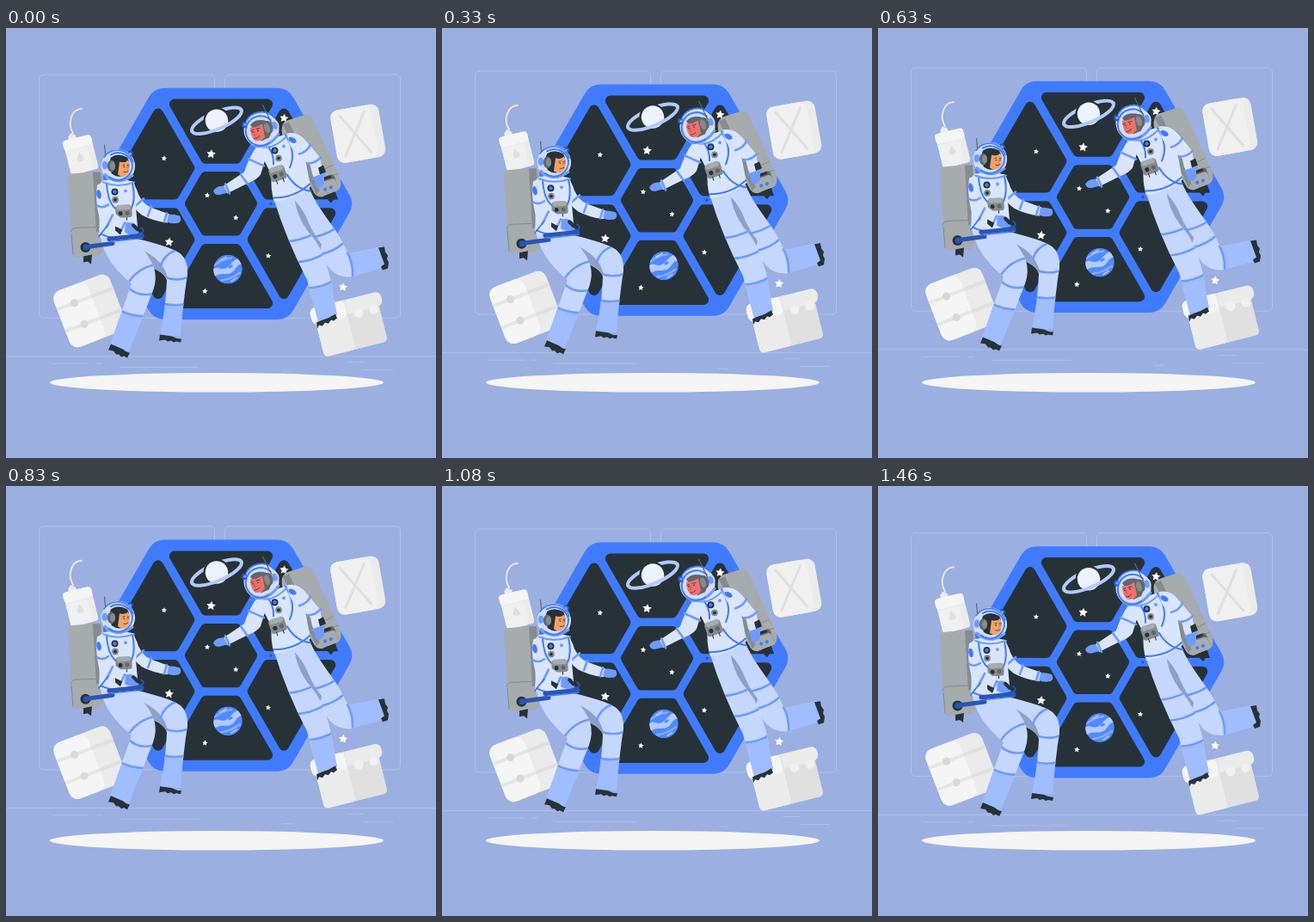
Recreate the animation shown at these times as an HTML page with a canvas. Size 500x500 px, loop 1500 ms.

```html
<!DOCTYPE html>
<html lang="en">
<head>
<meta charset="utf-8">
<title>Floating astronauts</title>
<style>
html, body { margin: 0; width: 100%; height: 100%; overflow: hidden; background: #9bafe1; }
canvas { display: block; width: 500px; height: 500px; }
</style>
</head>
<body>
<canvas id="stage"></canvas>
<script>
const canvas = document.getElementById('stage');
const ctx = canvas.getContext('2d');
const ratio = window.devicePixelRatio || 1;
canvas.width = canvas.height = 500 * ratio;

const LOOP = 1500, LEAD = 45, RISE = 9.4;
const BG = '#9bafe1', BLUE = '#407bff', DARK = '#263238', NAVY = '#2a55b4';
const TOP = '#d9e5ff', SUIT = '#c5d7ff', SHIN = '#9fbdff', BAND = '#6f9bff', GLASS = '#cfddff';
const GREY = '#a6abad', MID = '#858b8e', DEEP = '#5f676b', FOLD = '#8fa0c8';
const WHITE = '#f5f5f5', PAPER = '#f0f0f0', SOFT = '#ebebeb', DIM = '#e0e0e0';

function fill(color, d) {
  ctx.fillStyle = color;
  ctx.fill(new Path2D(d));
}

function line(color, width, d) {
  ctx.strokeStyle = color;
  ctx.lineWidth = width;
  ctx.stroke(new Path2D(d));
}

function oval(color, x, y, rx, ry = rx, turn = 0) {
  ctx.beginPath();
  ctx.ellipse(x, y, rx, ry, turn, 0, 7);
  ctx.fillStyle = color;
  ctx.fill();
}

function box(color, x, y, w, h, r = 0) {
  ctx.beginPath();
  ctx.roundRect(x, y, w, h, r);
  ctx.fillStyle = color;
  ctx.fill();
}

function posed(x, y, degrees, draw) {
  ctx.save();
  ctx.translate(x, y);
  ctx.rotate(degrees * Math.PI / 180);
  draw();
  ctx.restore();
}

function clipped(d, draw) {
  ctx.save();
  ctx.clip(new Path2D(d));
  draw();
  ctx.restore();
}

function roundedPoly(color, points, r) {
  const [ax, ay] = points[0], [zx, zy] = points[points.length - 1];
  ctx.beginPath();
  ctx.moveTo((ax + zx) / 2, (ay + zy) / 2);
  points.forEach(([x, y], i) => {
    const [nx, ny] = points[(i + 1) % points.length];
    ctx.arcTo(x, y, nx, ny, r);
  });
  ctx.closePath();
  ctx.fillStyle = color;
  ctx.fill();
}

function hexagon(color, apothem, r) {
  const radius = apothem / Math.cos(Math.PI / 6);
  const points = Array.from({ length: 6 }, (_, i) =>
    [radius * Math.cos(i * Math.PI / 3), radius * Math.sin(i * Math.PI / 3)]);
  roundedPoly(color, points, r);
}

function star(x, y, size) {
  ctx.beginPath();
  for (let i = 0; i < 10; i++) {
    const r = i % 2 ? size * 0.5 : size;
    const a = i * Math.PI / 5 - Math.PI / 2 + 0.12;
    ctx.lineTo(x + r * Math.cos(a), y + r * Math.sin(a));
  }
  ctx.fillStyle = '#fff';
  ctx.fill();
}

function room() {
  ctx.strokeStyle = '#b7c5ea';
  ctx.lineWidth = 0.8;
  for (const x of [38.5, 254.5]) {
    ctx.beginPath();
    ctx.roundRect(x, 54.7, 204, 283, 5);
    ctx.stroke();
  }
  line('#b7c5ea', 0.8, 'M0 382.4H500M53 390.8H96M105 390.8H111M132 394.9H224M322 400.7H332M397 389.2H416M417 398.2H450');
}

function saturn() {
  posed(245, 108.3, -23, () => {
    const ring = (from, to) => {
      ctx.beginPath();
      ctx.ellipse(0, 0, 31.2, 9.8, 0, from, to);
      ctx.strokeStyle = '#b3caff';
      ctx.lineWidth = 4;
      ctx.stroke();
    };
    ring(Math.PI, 2 * Math.PI);
    oval(DARK, 0, 0, 15.5);
    oval('#edf2ff', 0, 0, 13.2);
    ring(0, Math.PI);
  });
}

function jupiter() {
  ctx.save();
  ctx.beginPath();
  ctx.arc(258, 281.2, 16.8, 0, 7);
  ctx.clip();
  oval('#508aff', 258, 281, 17);
  fill('#b3caff', 'M240 282C246 275 250 284 257 279S264 268 276 268V275C267 274 268 284 260 286S250 284 241 291Z');
  line('#8fb2ff', 2, 'M243 276Q252 269 262 268M250 294Q261 293 272 285');
  line('#b3caff', 1.6, 'M249 271L256 267M262 295L268 291');
  oval('#508aff', 261, 278, 3, 1.6, -0.5);
  ctx.restore();
}

function porthole() {
  ctx.save();
  ctx.translate(250, 204.9);
  hexagon(BLUE, 134.6, 21);
  hexagon(DARK, 37.2, 5);
  for (let i = 0; i < 6; i++) {
    roundedPoly(DARK, [[-64.5, -121.7], [64.5, -121.7], [21.2, -46.6], [-21.2, -46.6]], 6);
    ctx.rotate(Math.PI / 3);
  }
  ctx.restore();
  saturn();
  jupiter();
  for (const [x, y, size] of [[238.5, 147.2, 5.5], [323.3, 105.5, 5.3], [183.8, 152.2, 3.3],
    [234, 195.2, 3.3], [267.3, 221.2, 3.3], [189.7, 249.5, 5.4], [231.3, 306.7, 3.4], [305, 265.5, 3.3]]) {
    star(x, y, size);
  }
}

function cargo() {
  posed(408.8, 123.4, -10, () => {
    box(SOFT, -28, -31, 57, 62, 9);
    box(PAPER, -28, -31, 48, 62, 9);
    line(DIM, 3, 'M-17 -24L12 24M12 -24L-18 23');
  });

  line(SOFT, 1.8, 'M78 123C71 111 76 95 88 94.5');
  posed(86.5, 147.7, -14, () => {
    fill(SOFT, 'M-9 -23L-5 -27L0 -23V-19H-9Z');
    box(SOFT, -16, -20, 33, 41, 4);
    box(PAPER, -16, -20, 26, 41, 4);
    box(WHITE, -17, -20, 34, 12, 4);
    line(SOFT, 1, 'M-16 -7H16');
    fill(DIM, 'M-1 -3C1 1 3 3 3 5C3 9 -5 9 -5 5C-5 3 -3 1 -1 -3Z');
  });

  posed(97.5, 329.5, -21, () => {
    box(SOFT, -35, -35, 70, 70, 10);
    box(WHITE, -35, -35, 43, 70, 10);
    box('#e6e6e6', -35, -17, 43, 4);
    box('#e6e6e6', -35, 10, 43, 4);
    box(DIM, 8, -17, 27, 4);
    box(DIM, 8, 10, 27, 4);
    oval('#d9d9d9', -13.5, -15, 4.6);
    oval('#d9d9d9', -11.5, 12, 4.6);
  });

  posed(399, 345.2, -14, () => {
    box(DIM, -37, -17, 76, 47, 5);
    box(SOFT, -37, -17, 38, 47, 5);
    box(SOFT, -41, -29, 85, 17, 7);
    box(WHITE, -41, -29, 42, 21, 7);
    for (const x of [14, 32]) oval(PAPER, x, -10, 5.5);
    line(DIM, 0.8, 'M1 -28V30');
  });
}

function womanPack() {
  fill(GREY, 'M76 170L108 167Q115 170 114 190L113 258Q111 265 105 266L83 267Q77 267 77 260L76 235L72 178Q71 171 76 170Z');
  fill(MID, 'M101 168L110 168L114 236L105 238Z');
  line(MID, 1, 'M75 238Q76 233 82 233L106 232M76 240L78 264');
  fill(DARK, 'M90 266L100 264L99 275L95 272L90 273Z');
}

function womanLegs() {
  const far = 'M140 243C165 248 192 255 203 263Q212 271 211 287Q206 318 203 359L179 357Q186 325 187 294Q184 284 166 278Q140 266 140 243Z';
  clipped(far, () => {
    box(SUIT, 130, 240, 90, 85);
    fill(SHIN, 'M170 320Q195 325 215 321V370H170Z');
    fill(FOLD, 'M150 254C165 262 184 270 188 292L168 280Z');
    line(BAND, 2.6, 'M180 277Q184 264 197 259M184 290Q198 296 213 290M180 320Q194 325 210 321');
  });
  fill(DARK, 'M179 357L193 359Q198 362 204 362L203 366L198 365L195 366L192 364L188 365L185 363L178 364Z');

  const near = 'M109 240L148 241C157 257 167 265 172 279Q176 292 171 306L143 377L121 368L146 298C133 286 114 270 109 240Z';
  clipped(near, () => {
    box(SUIT, 100, 235, 80, 110);
    fill(SHIN, 'M120 327Q145 336 175 335V385H110V330Z');
    line(BAND, 2.6, 'M142 297Q153 280 172 276M143 303Q155 314 172 309M131 328Q145 336 163 336');
  });
  fill(DARK, 'M122 368L136 374Q140 378 144 378L141 384L137 382L134 383L131 380L128 380L125 376L119 375Z');
}

function womanBody() {
  // reaching arm
  fill(TOP, 'M143 180Q151 182 154 194Q160 206 168 209L190 217L188 227Q171 225 158 218Q147 210 142 197Z');
  line(BAND, 2.6, 'M151 207L160 199M165 219L169 208M184 226L187 216');
  fill(BAND, 'M189 217Q196 217 202 219Q205 224 201 227Q193 229 187 226Z');

  fill(TOP, 'M113 178Q130 174 148 179Q154 190 151 210L154 243Q130 250 108 243Q110 215 106 196Q106 182 113 178Z');
  line(BLUE, 2, 'M117 181Q118 204 129 212M147 181Q151 199 146 210M110 240Q130 250 155 239');
  line(BAND, 2, 'M113 180Q130 187 149 180');
  fill(FOLD, 'M112 206L122 226L134 235L120 230Z');
  oval(DARK, 126.5, 191, 4);
  oval(BLUE, 126.5, 191, 2.2);
  oval(MID, 127, 200.3, 3.9);
  oval(DARK, 127, 200.3, 1.9);
  oval(BAND, 139, 190, 2);
  posed(137, 214, -3, () => {
    box(MID, -9.5, -7, 19, 14, 3);
    box(GREY, -8, -8, 16, 6, 2);
    oval(DARK, -4, 2, 2.5);
    oval(DEEP, 4, 2, 2.5);
    line(DARK, 1, 'M-5 7V11M3 7V10');
  });

  // resting arm
  fill(TOP, 'M106 183Q115 178 118 195L118 210L143 228L139 238Q120 238 110 226Q105 210 105 192Z');
  line(BAND, 2.6, 'M106 207Q112 211 119 206M117 232L124 218M133 238L138 227');
  oval(BLUE, 108, 194, 2.7, 5.3, -0.2);
  fill(DARK, 'M127 231L135 235L133 241L127 236Z');
  fill(BAND, 'M139 227Q147 225 153 231L154 239Q145 243 138 238Z');
  line(DARK, 4, 'M148 230L153 235');

  // hose and sprayer
  oval(DARK, 92.5, 255.5, 6);
  oval(NAVY, 93, 255.5, 3.5);
  line(NAVY, 5, 'M94 255L124 251');
  line(NAVY, 5.2, 'M120 246L158 242');
  line(BLUE, 1.4, 'M123 249L159 245');
  line(NAVY, 1.8, 'M154 240Q164 238 157 233');
  line(BLUE, 1.8, 'M108 243L119 229');
}

function womanHead() {
  line(DEEP, 1.2, 'M114.5 137L116 153');
  oval(TOP, 130.5, 161, 19.5);
  oval(GLASS, 131, 161, 17);
  line(BLUE, 1.6, 'M114 151A19 19 0 0 1 148 156');
  line(BAND, 3, 'M115 171Q129 185 147 172');
  line(BLUE, 2, 'M120 174A17 17 0 0 0 147 159A17 17 0 0 0 122 148');
  fill(DARK, 'M122 151Q130 145 141 151Q145 157 142 169Q132 177 123 170Q118 160 122 151Z');
  fill('#f3a267', 'M132 156Q139 158 142 154Q146 163 142 170Q137 176 130 171Z');
  line(DARK, 0.8, 'M136 160L138 159.5M141 160L143 159.7M137 168Q140 169 142 167');
  oval(DARK, 137.3, 162, 0.8);
  oval(DARK, 142, 161.7, 0.7);
  line('#d97e45', 0.8, 'M140 162L141.5 165');
  oval(SUIT, 116, 160, 5.5, 7);
  oval(BAND, 115, 160, 3.2, 4.5);
  oval(DEEP, 122.5, 161, 4.6, 6.8);
  oval(MID, 124, 161, 3, 5);
  oval(NAVY, 145, 146, 3.4, 2.6, 0.8);
  oval(BAND, 144, 147, 2);
}

function manPack() {
  fill(GREY, 'M327 108L349 101Q355 101 358 109L389 176Q391 188 384 190L367 197Q360 197 357 190L321 124Q319 111 327 108Z');
  fill(MID, 'M322 113L329 110L366 187L361 194Z');
  line(MID, 1, 'M357 171L380 160M361 178L386 170');
  fill(DARK, 'M372 195L383 191L386 200L381 200L378 204L375 201Z');
}

function manLegs() {
  const far = 'M330 190L352 185C362 211 382 231 390 247L398 263L436 255L441 278L401 290Q386 291 377 281Q352 251 335 215Z';
  clipped(far, () => {
    box(SUIT, 325, 180, 120, 115);
    fill(SHIN, 'M397 255L404 292H450V245Z');
    fill(FOLD, 'M335 200Q347 213 352 227Q357 239 367 252L364 266L337 230Z');
    line(BAND, 2.6, 'M355 244Q371 242 384 233M364 264Q381 261 393 250M397 262Q404 274 403 292');
  });
  fill(DARK, 'M433 256L440 255L441 261L444 265L443 269L445 273L444 280L438 282L436 278L440 275Z');

  const near = 'M311 198L335 195Q337 218 351 237Q364 251 370 268Q379 293 380 309L385 334L363 343Q357 318 350 293Q326 247 311 198Z';
  clipped(near, () => {
    box(SUIT, 305, 190, 85, 155);
    fill(SHIN, 'M345 303Q365 304 385 291V345H350Z');
    line(BAND, 2.6, 'M326 249Q343 248 360 239M335 273Q354 273 372 262M350 303Q367 303 383 293');
  });
  fill(DARK, 'M361 343L368 340Q376 338 383 333L385 338L381 341L378 340L375 344L371 343L368 347L364 346L362 350Z');
}

function manBody() {
  // reaching arm
  fill(TOP, 'M291 139Q301 135 304 145L296 171Q292 177 281 181L257 193L253 184L277 168Q283 150 291 139Z');
  line(BAND, 2.6, 'M282 153L300 161M273 171L281 182M255 182L260 193');
  fill(BAND, 'M253 184Q244 184 241 190Q243 196 250 194L258 192Z');

  fill(TOP, 'M294 139Q311 126 332 123Q342 126 346 142L354 185Q337 199 312 203Q307 187 309 171Q300 156 294 139Z');
  line(BLUE, 2, 'M302 135Q312 146 311 159M325 125Q338 145 330 163M311 198Q336 198 353 182');
  line(BLUE, 2, 'M327 171Q337 188 354 190');
  line(BAND, 2, 'M298 139Q312 142 328 125');
  oval(DARK, 312.5, 143, 4);
  oval(BLUE, 312.5, 143, 2.2);
  oval(MID, 317, 152, 3.9);
  oval(DARK, 317, 152, 1.9);
  oval(BAND, 323, 138, 2);
  posed(316, 170, -19, () => {
    box(MID, -9.5, -8, 19, 16, 3);
    box(GREY, -8, -9, 16, 6, 2);
    oval(DARK, -4, 2, 2.6);
    oval(DEEP, 4, 2, 2.6);
    line(DARK, 1, 'M-4 7V11M4 7V11');
  });
  oval(NAVY, 308, 205, 1.7);

  // resting arm
  fill(TOP, 'M327 123Q340 121 349 132L365 151L370 176L360 179Q355 170 354 160L338 147Q327 137 327 123Z');
  line(BAND, 2.6, 'M341 147Q351 144 354 136M351 158Q360 158 366 151M357 175L370 171');
  oval(BLUE, 333, 131, 5, 3, 0.5);
  fill(DARK, 'M363 163L369 160L372 168L365 171Z');
  posed(374, 184, -19, () => {
    box(DEEP, -11, -11, 22, 18, 4);
    box(GREY, -11, -6, 22, 15, 4);
    oval(BLUE, -4, 3, 2);
    oval(BLUE, 3, 3, 2);
    line(DARK, 3, 'M-1 -9H6');
  });
  fill(BAND, 'M358 175Q364 169 370 173L370 181Q366 189 360 185Z');
}

function manHead() {
  oval(TOP, 297, 119, 20.5);
  oval(GLASS, 296, 119, 17.5);
  line(BLUE, 1.7, 'M278 112A20 20 0 0 1 312 105');
  line(BAND, 3, 'M290 138Q306 140 317 124');
  line(BLUE, 2, 'M309 109A17 17 0 0 0 280 114A17 17 0 0 0 306 134');
  fill(DEEP, 'M284 113Q291 105 304 109Q312 118 306 128L297 132Z');
  fill('#f0706b', 'M284 116Q290 117 298 112L301 127Q296 134 289 131Q284 126 284 116Z');
  line(DARK, 0.8, 'M285 120L287.5 119M291 118L295 117M289 129Q293 129 295 126');
  oval(DARK, 287, 121.5, 0.8);
  oval(DARK, 293, 120, 0.8);
  line('#c94f50', 0.9, 'M289 121L288.5 125L290 125');
  oval(SUIT, 312, 114, 5.5, 7, -0.3);
  oval(BAND, 312.5, 114, 3, 4.5, -0.3);
  oval(DEEP, 305.5, 116, 4.8, 7.5, -0.3);
  oval(MID, 303.5, 117, 3.2, 6, -0.3);
  line(DEEP, 1.2, 'M298.5 90L309 111');
  oval(NAVY, 277, 113, 3, 3.7);
  oval(BAND, 278, 113, 1.8);
}

function draw(now) {
  // steady rise and fall
  const phase = (now + LEAD) % LOOP / LOOP;
  const lift = RISE * (1 - Math.abs(2 * phase - 1));
  ctx.setTransform(ratio, 0, 0, ratio, 0, 0);
  ctx.lineCap = ctx.lineJoin = 'round';
  ctx.fillStyle = BG;
  ctx.fillRect(0, 0, 500, 500);
  ctx.save();
  ctx.translate(0, -lift);
  room();
  ctx.restore();
  oval(WHITE, 245, 412.3, 194, 11.3);
  ctx.translate(0, -lift);
  porthole();
  cargo();
  star(392, 302, 5.3);
  womanPack();
  womanLegs();
  womanBody();
  womanHead();
  manPack();
  manLegs();
  manBody();
  manHead();
}

const start = performance.now();
function tick() {
  draw((performance.now() - start) % LOOP);
  requestAnimationFrame(tick);
}
tick();
</script>
</body>
</html>
```
